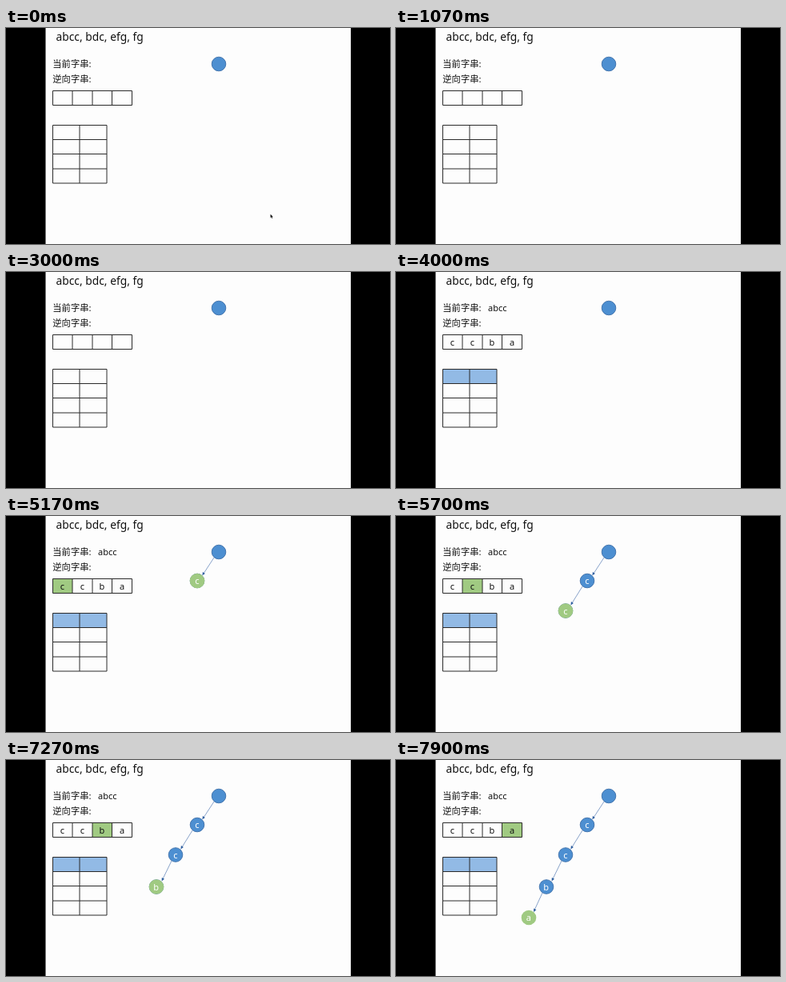
Animation, 480 px wide and 270 px high, one loop 8000 ms. Source, as an HTML page:

```html
<!DOCTYPE html>
<html lang="zh">
<head>
<meta charset="utf-8">
<title>Reversed words</title>
<style>
  html, body { margin: 0; width: 100%; height: 100%; overflow: hidden; background: #000; }
  svg { display: block; width: 100vw; height: 100vh; }
  text { font: 11px "Noto Sans", "Noto Sans CJK SC", sans-serif; fill: #111; }
  .title { font-size: 13.8px; }
  .label { font-size: 11.3px; }
  .mid text { text-anchor: middle; }
  .node text { fill: #fff; }
  .grid { fill: none; stroke: #2b2b2b; stroke-width: 1; }
  .blue { fill: #4d8fd1; stroke: #3d6fa9; stroke-width: .9; }
  .green { fill: #a0ca82; }
  .line { stroke: #6285b8; stroke-width: .75; }
  .head { fill: #2f5f9f; }

  .step { animation: 8s step-end infinite; }
  .cursor { animation-name: cursor; }
  .word { animation-name: word; }
  .cells { animation-name: cells; }
  .add1 { animation-name: add1; }
  .add2 { animation-name: add2; }
  .add3 { animation-name: add3; }
  .add4 { animation-name: add4; }
  .now1 { animation-name: now1; }
  .now2 { animation-name: now2; }
  .now3 { animation-name: now3; }

  @keyframes cursor { 0% { opacity: 1 } 5% { opacity: 0 } 100% { opacity: 0 } }
  @keyframes word { 0% { opacity: 0 } 40.875% { opacity: 1 } }
  @keyframes cells { 0% { opacity: 0 } 44.125% { opacity: 1 } }
  @keyframes add1 { 0% { opacity: 0 } 55.375% { opacity: 1 } }
  @keyframes add2 { 0% { opacity: 0 } 69.375% { opacity: 1 } }
  @keyframes add3 { 0% { opacity: 0 } 83.375% { opacity: 1 } }
  @keyframes add4 { 0% { opacity: 0 } 97.375% { opacity: 1 } }
  @keyframes now1 { 0% { opacity: 0 } 55.375% { opacity: 1 } 69.375% { opacity: 0 } 100% { opacity: 0 } }
  @keyframes now2 { 0% { opacity: 0 } 69.375% { opacity: 1 } 83.375% { opacity: 0 } 100% { opacity: 0 } }
  @keyframes now3 { 0% { opacity: 0 } 83.375% { opacity: 1 } 97.375% { opacity: 0 } 100% { opacity: 0 } }
</style>
</head>
<body>
<svg viewBox="0 0 480 270" preserveAspectRatio="none">
  <rect width="480" height="270"/>
  <rect x="49.5" width="381.5" height="270" fill="#fdfdfd"/>

  <text class="title" x="62.5" y="16">abcc, bdc, efg, fg</text>
  <text class="label" x="58.3" y="49.3">当前字串:</text>
  <text class="label" x="58.3" y="67.5">逆向字串:</text>
  <text class="step word" x="115" y="49.2">abcc</text>

  <!-- current letter -->
  <rect class="green step now1" x="58" y="78.5" width="25" height="18"/>
  <rect class="green step now2" x="83" y="78.5" width="25" height="18"/>
  <rect class="green step now3" x="108" y="78.5" width="24.5" height="18"/>
  <rect class="green step add4" x="132.5" y="78.5" width="25" height="18"/>
  <rect class="step cells" x="58" y="121.5" width="68" height="18" fill="#92bae5"/>

  <path class="grid" d="M58.5 78.5H157.5V96.5H58.5ZM83 78.5v18M108 78.5v18M132.5 78.5v18"/>
  <path class="grid" d="M58.5 121.5H126V194H58.5ZM92 121.5V194M58 139.5h68M58 157.5h68M58 176h68"/>

  <g class="mid step cells">
    <text x="70.5" y="92">c</text>
    <text x="95.5" y="92">c</text>
    <text x="120" y="92">b</text>
    <text x="145" y="92">a</text>
  </g>

  <!-- tree -->
  <circle class="blue" cx="266" cy="45" r="8.8"/>
  <g class="mid node">
    <g class="step add1">
      <path class="line" d="M260 52L246.5 72.7"/>
      <path class="head" d="M245.4 74.3l.5-4.4 3 2z"/>
      <circle class="blue" cx="239" cy="81" r="8.8"/>
      <circle class="green step now1" cx="239" cy="81" r="9.3"/>
      <text x="239" y="85.3">c</text>
    </g>
    <g class="step add2">
      <path class="line" d="M233 88L219.5 109.7"/>
      <path class="head" d="M218.4 111.5l.5-4.4 3 2z"/>
      <circle class="blue" cx="212" cy="118.5" r="8.8"/>
      <circle class="green step now2" cx="212" cy="118.5" r="9.3"/>
      <text x="212" y="122.8">c</text>
    </g>
    <g class="step add3">
      <path class="line" d="M207 126L195.5 149.7"/>
      <path class="head" d="M194.6 151.5l.2-4.4 3.2 1.6z"/>
      <circle class="blue" cx="188" cy="158.5" r="8.8"/>
      <circle class="green step now3" cx="188" cy="158.5" r="9.3"/>
      <text x="187.7" y="162.8">b</text>
    </g>
    <g class="step add4">
      <path class="line" d="M183 166L172.8 188.2"/>
      <path class="head" d="M172 190l.2-4.4 3.2 1.6z"/>
      <circle class="green" cx="166" cy="197" r="9.3"/>
      <text x="165.8" y="201.3">a</text>
    </g>
  </g>

  <path class="step cursor" d="M330.6 232.8v4.4l1-.9.8 1.7.8-.4-.8-1.6h1.3z"/>
</svg>
</body>
</html>
```
